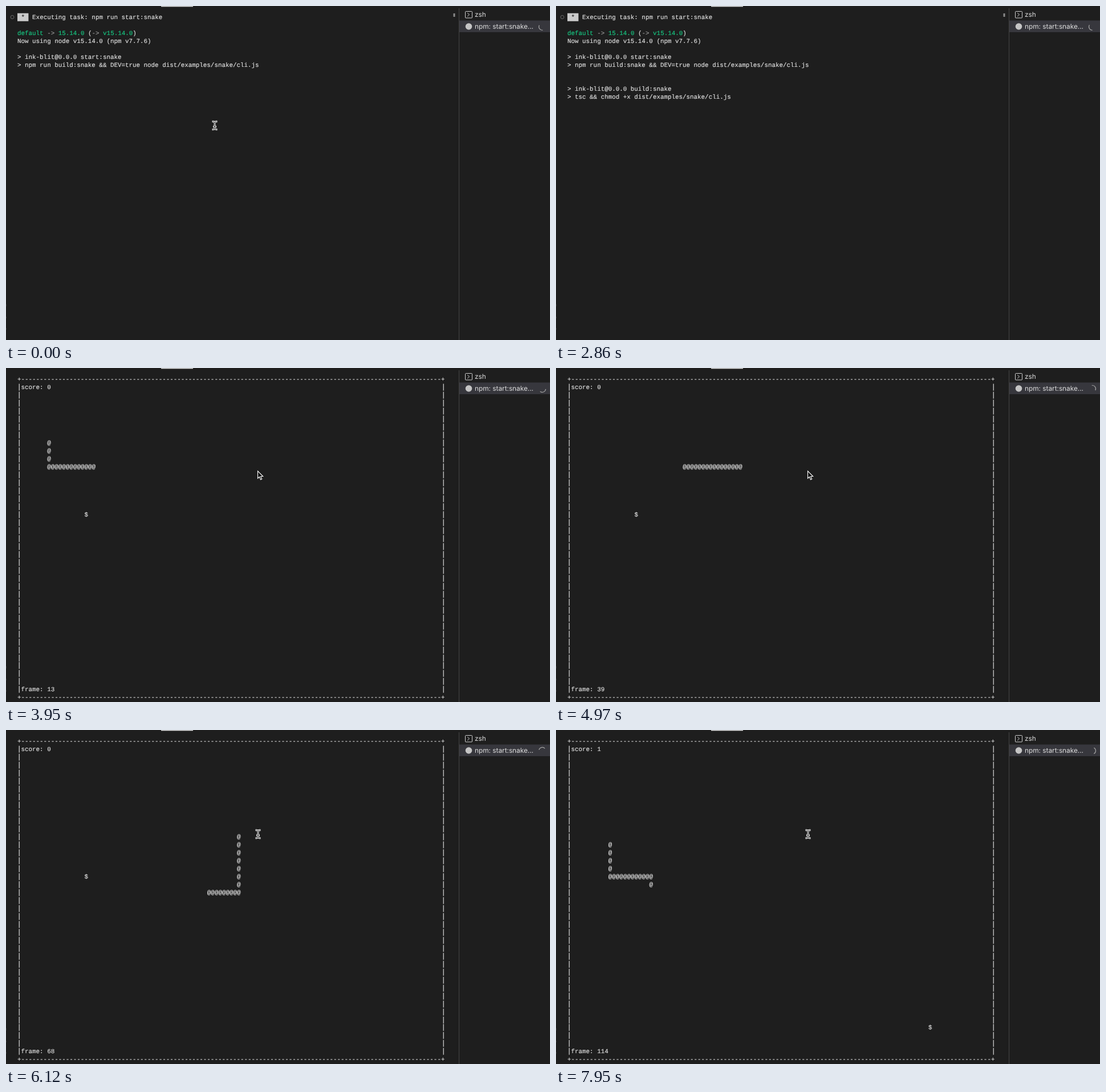
Write an HTML page that moves like this. It is 954 px wide and 587 px high and loops after 8000 ms.

```html
<!DOCTYPE html>
<html lang="en">
<head>
<meta charset="utf-8">
<title>Terminal snake</title>
<style>
html, body { margin: 0; width: 100%; height: 100%; overflow: hidden; background: #1e1e1e; }
svg { display: block; width: 954px; height: 587px; }
text { white-space: pre; text-rendering: geometricPrecision; }
.term { font: 10.875px "Liberation Mono", monospace; fill: #e2e2e2; stroke: #e2e2e2; stroke-width: .15; }
.term .green { fill: #17c983; stroke: #17c983; }
.term .dim { fill: #9a9a9a; stroke: #9a9a9a; }
.term .dark { fill: #1e1e1e; stroke: #1e1e1e; }
.term .bar { font-size: 12.5px; text-anchor: middle; }
.side { font: 11.8px Inter, sans-serif; fill: #dedede; }
</style>
</head>
<body>
<svg viewBox="0 0 954 587">
  <rect width="954" height="587" fill="#1e1e1e"/>
  <path d="M.5 524v4M.5 546v3M.5 566v3" stroke="#343434"/>
  <rect x="272" width="56" height="1.3" fill="#e7e7e7"/>
  <path d="M794.5 4V587" stroke="#444"/>
  <rect x="795" y="25.5" width="159" height="20.5" fill="#37373d"/>
  <g fill="none" stroke="#cfcfcf">
    <rect x="805.5" y="9.5" width="12" height="11.5" rx="1"/>
    <path d="M809.3 12.2l3.2 3-3.2 3"/>
  </g>
  <circle cx="811.5" cy="36" r="5.8" fill="#c5c5c5"/>
  <g class="side">
    <text x="822" y="19.3">zsh</text>
    <text x="822" y="39.9">npm: start:snake...</text>
  </g>
  <path id="spin" fill="none" stroke="#a2a2a2" stroke-width="1.2"/>

  <g id="log" class="term">
    <circle cx="11" cy="19.5" r="3" fill="none" stroke="#6a6a6a" stroke-width="1"/>
    <rect x="20" y="12.7" width="19.4" height="14" fill="#ccc" stroke="none"/>
    <rect x="784.5" y="13" width="3" height="6" fill="#8a8a8a" stroke="none"/>
  </g>
  <g id="game" class="term"></g>

  <g id="ibeam" fill="none" stroke-linecap="square">
    <path d="M-3-7Q-.8-7 0-5.6Q.8-7 3-7M0-5.6V5.6M-3 7Q-.8 7 0 5.6Q.8 7 3 7M-1.5 2H1.5" stroke="#fff" stroke-width="2.8"/>
    <path d="M-3-7Q-.8-7 0-5.6Q.8-7 3-7M0-5.6V5.6M-3 7Q-.8 7 0 5.6Q.8 7 3 7M-1.5 2H1.5" stroke="#111" stroke-width=".9"/>
  </g>
  <path id="arrow" d="M0 0V13L3 10.3L5 15.2L7.2 14.3L5.2 9.5H9.2Z" fill="#111" stroke="#fff" stroke-width="1.1"/>
</svg>
<script>
const LOOP = 8000, CELL = 6.526, ROW = 13.98;
const BUILD = 450, CLEAR = 3300, GAME = 3418, TICK = 39.5, BEAM_BACK = 5500;
const EAT = 103;

const $ = id => document.getElementById(id);
const log = $('log'), game = $('game');
const show = (el, on) => el.setAttribute('display', on ? 'inline' : 'none');
const colX = col => 20 + col * CELL;
const rowY = row => 23.2 + row * ROW;

function place(el, col, row) {
  el.setAttribute('x', colX(col));
  el.setAttribute('y', rowY(row));
}

function put(parent, col, row, str, cls) {
  const el = document.createElementNS('http://www.w3.org/2000/svg', 'text');
  place(el, col, row);
  el.textContent = str;
  if (cls) el.setAttribute('class', cls);
  parent.append(el);
  return el;
}

// Shell output
put(log, 1, 0, '*', 'dark');
put(log, 4, 0, 'Executing task: npm run start:snake');
put(log, 0, 2, 'default', 'green');
put(log, 8, 2, '->', 'dim');
put(log, 11, 2, '15.14.0', 'green');
put(log, 19, 2, '(');
put(log, 20, 2, '->', 'dim');
put(log, 23, 2, 'v15.14.0', 'green');
put(log, 31, 2, ')');
put(log, 0, 3, 'Now using node v15.14.0 (npm v7.7.6)');
put(log, 0, 5, '> ink-blit@0.0.0 start:snake');
put(log, 0, 6, '> npm run build:snake && DEV=true node dist/examples/snake/cli.js');
const build = [
  put(log, 0, 9, '> ink-blit@0.0.0 build:snake'),
  put(log, 0, 10, '> tsc && chmod +x dist/examples/snake/cli.js')
];

// Game board
for (const row of [0, 40]) put(game, 0, row, '+' + '-'.repeat(113) + '+');
for (let row = 1; row < 40; row++)
  for (const col of [0.5, 114.5]) put(game, col, row, '|', 'bar');
const score = put(game, 1, 1, ''), counter = put(game, 1, 39, '');
const food = put(game, 18, 17, '$');
const cells = Array.from({ length: 17 }, () => put(game, 8, 8, '@'));

// Linear stops as [time, x, y]
function along(stops, t, ease = k => k) {
  let i = 1;
  while (i < stops.length - 1 && t > stops[i][0]) i++;
  const [t0, x0, y0] = stops[i - 1], [t1, x1, y1] = stops[i];
  const k = ease(Math.min(1, Math.max(0, (t - t0) / (t1 - t0))));
  return [x0 + (x1 - x0) * k, y0 + (y1 - y0) * k];
}

// Head position by tick, at each turn
const turns = [[-2, 8, 8], [1, 8, 11], [52, 59, 11], [60, 59, 19], [97, 22, 19],
  [99, 22, 17], [110, 11, 17], [118, 11, 9]];

const mouse = [[0, 366, 210], [80, 366, 210], [300, 400, 217], [800, 526.5, 168],
  [1730, 526.5, 168], [2300, 407, -14], [2900, 420, -14], [3150, 430, 300], [3420, 442, 183]];
const smooth = k => k * k * (3 - 2 * k);

function drawSpinner(t) {
  const mid = 145 + t / 1420 * 360;
  const at = deg => {
    const a = deg * Math.PI / 180;
    return (940.5 + 6 * Math.cos(a)).toFixed(2) + ' ' + (36.5 + 6 * Math.sin(a)).toFixed(2);
  };
  $('spin').setAttribute('d', `M${at(mid - 62)}A6 6 0 0 1 ${at(mid + 62)}`);
}

function drawMouse(t) {
  const [x, y] = along(mouse, t, smooth);
  const arrow = t >= GAME && t < BEAM_BACK;
  show($('arrow'), arrow);
  show($('ibeam'), !arrow);
  $('arrow').setAttribute('transform', `translate(${x - 0.5} ${y - 2})`);
  $('ibeam').setAttribute('transform', `translate(${x} ${y})`);
}

function drawGame(t) {
  const tick = Math.floor((t - GAME) / TICK), eaten = tick >= EAT;
  score.textContent = 'score: ' + (eaten ? 1 : 0);
  counter.textContent = 'frame: ' + tick;
  place(food, eaten ? 97 : 18, eaten ? 36 : 17);
  cells.forEach((cell, i) => {
    place(cell, ...along(turns, tick - i).map(Math.round));
    show(cell, i < 16 || eaten);
  });
}

function draw(t) {
  show(log, t < CLEAR);
  build.forEach(el => show(el, t >= BUILD));
  show(game, t >= GAME);
  if (t >= GAME) drawGame(t);
  drawSpinner(t);
  drawMouse(t);
}

const start = performance.now();
function loop(now) {
  draw(Math.max(0, now - start) % LOOP);
  requestAnimationFrame(loop);
}
draw(0);
requestAnimationFrame(loop);
</script>
</body>
</html>
```
